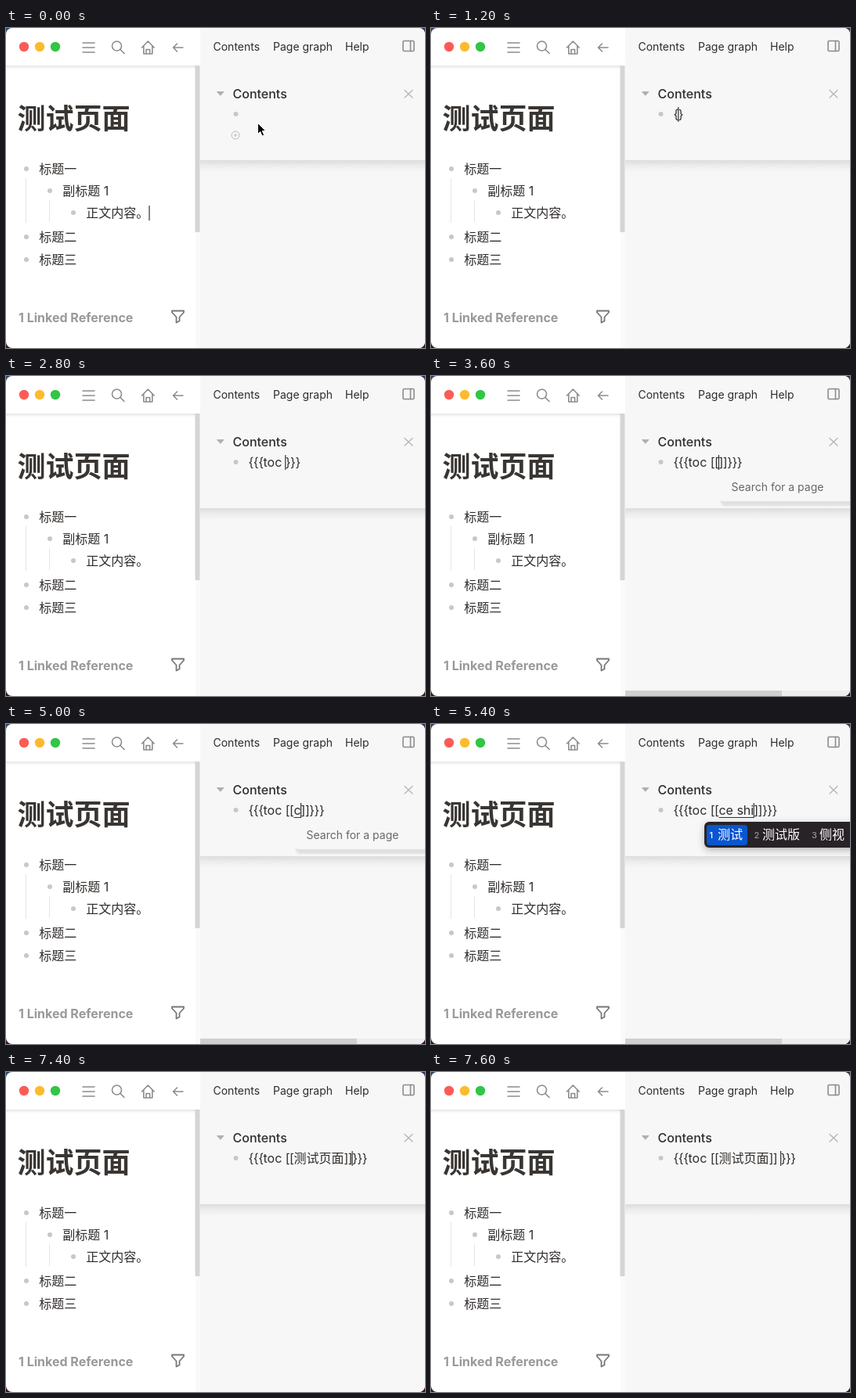
An HTML page that plays this animation: 535 px wide and 409 px high, repeating every 8 s.

```html
<!DOCTYPE html>
<html lang="zh-CN">
<head>
<meta charset="utf-8">
<title>Table of contents macro</title>
<style>
html, body { margin: 0; width: 100%; height: 100%; overflow: hidden; background: #fff; }
svg { display: block; }
text { font: 16px Inter, "Noto Sans CJK SC", "Noto Sans CJK", sans-serif; fill: #302d2b; white-space: pre; }
.nav, .menu text { font-size: 14px; }
.title { font-size: 36px; font-weight: 700; fill: #393532; }
.head { font-weight: 500; }
.ref { font-weight: 700; fill: #999; }
.icon { fill: none; stroke: #8c8c8c; stroke-width: 1.6; stroke-linecap: round; stroke-linejoin: round; }
.menu rect.box { fill: #f7f7f7; filter: drop-shadow(2px 6px 1px rgba(0,0,0,.09)); }
.menu .hint { fill: #686868; }
.mark { fill: #fdf2ae; }
.ime { filter: drop-shadow(0 3px 5px rgba(0,0,0,.28)); }
.ime text { fill: #fff; font-weight: 500; }
.ime .num { font-size: 11px; fill: #99959a; }
.ime .on { fill: #fff; }
.caret { stroke: #333; stroke-width: 1.2; }
.tight { letter-spacing: -.5px; }
</style>
</head>
<body>
<svg width="535" height="409" viewBox="0 0 535 409">
  <defs>
    <linearGradient id="shade" x2="0" y2="1">
      <stop offset="0" stop-opacity=".11"/>
      <stop offset=".5" stop-opacity=".04"/>
      <stop offset="1" stop-opacity="0"/>
    </linearGradient>
    <linearGradient id="desk" x2=".3" y2="1">
      <stop offset="0" stop-color="#33456b"/>
      <stop offset="1" stop-color="#3a1520"/>
    </linearGradient>
    <clipPath id="win"><rect width="535" height="409" rx="8"/></clipPath>
  </defs>
  <rect width="535" height="409" fill="url(#desk)"/>
  <g clip-path="url(#win)">
    <rect width="535" height="409" fill="#fff"/>
    <rect x="242" y="48" width="6" height="361" fill="#fafafa"/>
    <rect x="241.500" y="48" width="6" height="213" fill="#d5d5d5"/>
    <rect y="48" width="242" height="5" fill="url(#shade)"/>
    <rect x="248" width="287" height="409" fill="#f7f7f7"/>
    <rect x="248" y="169" width="287" height="15" fill="url(#shade)"/>

    <circle cx="23" cy="24" r="6.200" fill="#fb5b56"/>
    <circle cx="43" cy="24" r="6.200" fill="#fcbb2e"/>
    <circle cx="63" cy="24" r="6.200" fill="#32c546"/>
    <g class="icon">
      <path d="M98 19h15M98 25h15M98 31h15"/>
      <circle cx="141.500" cy="23" r="6"/><path d="M146 27.500l5 5"/>
      <path d="M173.500 25l7.800-8 7.800 8M175.800 23v10h11V23M179 33v-5.500h4.600V33"/>
      <path d="M226 25h-12.500M218.500 20l-5 5 5 5"/>
      <rect x="507" y="16.500" width="14" height="13" rx="1.500"/><path d="M516.500 16.500v13"/>
      <path d="M212 361.500h15v2l-5.500 6v5l-4 2v-7l-5.500-6z" stroke="#777" stroke-width="1.800"/>
      <path d="M509 79.500l10 9.500M519 79.500l-10 9.500" stroke="#b5b5b5" stroke-width="1.300"/>
    </g>
    <path d="M269.500 81.500h8.500l-4.250 4.700z" fill="#b0b0b0" stroke="#b0b0b0" stroke-linejoin="round"/>

    <text class="nav" x="264.500" y="29">Contents</text>
    <text class="nav" x="341" y="29">Page graph</text>
    <text class="nav" x="433" y="29">Help</text>
    <text class="head" x="289.500" y="90">Contents</text>
    <text class="title" x="14.500" y="129">测试页面</text>
    <path d="M25.500 192v57M55.500 220v28" stroke="#e6e6e6"/>
    <g id="outline"></g>
    <text class="ref" x="16" y="376">1 Linked Reference</text>

    <path id="leftCaret" class="caret" d="M183 227v19"/>
    <circle cx="293.500" cy="110" r="3" fill="#c8c8c8"/>
    <g id="add" fill="none" stroke="#bdbdbd">
      <circle cx="293" cy="137" r="5"/><path d="M290.800 137h4.400M293 134.800v4.400"/>
    </g>

    <g id="bar">
      <rect x="248" y="402" width="287" height="7" fill="#ededed"/>
      <rect x="248" y="402" width="200" height="7" fill="#d0d0d0"/>
    </g>
    <g id="search" class="menu">
      <rect class="box" x="368" y="124" width="190" height="36" rx="6"/>
      <text class="hint" x="383.500" y="147">Search for a page</text>
    </g>
    <g id="pages" class="menu">
      <rect class="box" x="368" y="124" width="190" height="72" rx="6"/>
      <path d="M368 160h167v18q0 6-6 6h-161z" fill="#fff"/>
      <rect class="mark" x="384" y="133" width="28" height="18"/>
      <text x="384" y="147">测试页面</text>
      <rect class="mark" x="459" y="169" width="28" height="18"/>
      <text x="383.500" y="183">New page: </text>
      <text x="459" y="183">测试</text>
    </g>
    <g id="ime" class="ime">
      <rect x="349" y="125" width="210" height="33" rx="6" fill="#282326"/>
      <rect x="352" y="129" width="52" height="26" rx="4" fill="#0a56cf"/>
      <text class="num on" x="355.500" y="146">1</text><text x="366" y="147">测试</text>
      <text class="num" x="412.500" y="146">2</text><text x="423" y="147">测试版</text>
      <text class="num" x="486" y="146">3</text><text x="496" y="147">侧视</text>
    </g>

    <text id="line" x="309.500" y="116"></text>
    <path id="under" stroke="#333"/>
    <path id="caret" class="caret"/>
    <path id="mouse" d="M321.500 121.500v14l3.200-3 2.300 5.500 2.600-1.100-2.300-5.300h4.300z" fill="#000" stroke="#fff"/>
  </g>
</svg>
<script>
const $ = id => document.getElementById(id);
const LOOP = 8000, LINE_X = 309.5;

$('outline').innerHTML = [
  [26, 180, '标题一'], [56, 208, '副标题 1'], [86, 236, '正文内容。'],
  [26, 267, '标题二'], [26, 296, '标题三']
].map(([x, y, s]) =>
  `<circle cx="${x}" cy="${y}" r="3" fill="#c8c8c8"/><text x="${x + 16.3}" y="${y + 6}">${s}</text>`
).join('');

// time, text before the caret, text after it, visible parts, composed letters
const steps = [
  [0, '', '', 'leftCaret add mouse'],
  [200, '', '', 'caret add mouse'],
  [400, '', '', 'caret mouse'],
  [600, '', '', 'caret'],
  [1200, '{', '}', 'caret'],
  [1400, '{{', '}}', 'caret'],
  [1600, '{{{', '}}}', 'caret'],
  [2000, '{{{t', '}}}', 'caret'],
  [2200, '{{{to', '}}}', 'caret'],
  [2400, '{{{toc', '}}}', 'caret'],
  [2600, '{{{toc ', '}}}', 'caret'],
  [3200, '{{{toc [', ']}}}', 'caret'],
  [3400, '{{{toc [[', ']]}}}', 'caret search bar'],
  [4400, '{{{toc [[', ']]}}}', 'search bar'],
  [5000, '{{{toc [[c', ']]}}}', 'caret under search bar', 1],
  [5400, '{{{toc [[ce shi', ']]}}}', 'caret under ime bar', 6],
  [5600, '{{{toc [[测试', ']]}}}', 'caret pages bar'],
  [6800, '{{{toc [[测试', ']]}}}', 'pages bar'],
  [7400, '{{{toc [[测试页面]]', '}}}', 'caret'],
  [7600, '{{{toc [[测试页面]] ', '}}}', 'caret']
];
const parts = ['leftCaret', 'add', 'mouse', 'caret', 'under', 'search', 'pages', 'ime', 'bar'];
const line = $('line');

const xAfter = n => LINE_X + (n ? line.getSubStringLength(0, n) : 0);

function show([, before, after, visible, composed = 0]) {
  const on = visible.split(' ');
  parts.forEach(p => $(p).style.display = on.includes(p) ? '' : 'none');
  line.innerHTML = (before + after).replace(/[{}[\]]+/g, '<tspan class="tight">$&</tspan>');
  const x = Math.max(311, xAfter(before.length));
  $('caret').setAttribute('d', `M${x} 101v19`);
  $('under').setAttribute('d', `M${xAfter(before.length - composed)} 119.5H${x}`);
}

const start = performance.now();
function frame() {
  const t = (performance.now() - start) % LOOP;
  show(steps.findLast(s => s[0] <= t));
  requestAnimationFrame(frame);
}
frame();
</script>
</body>
</html>
```
